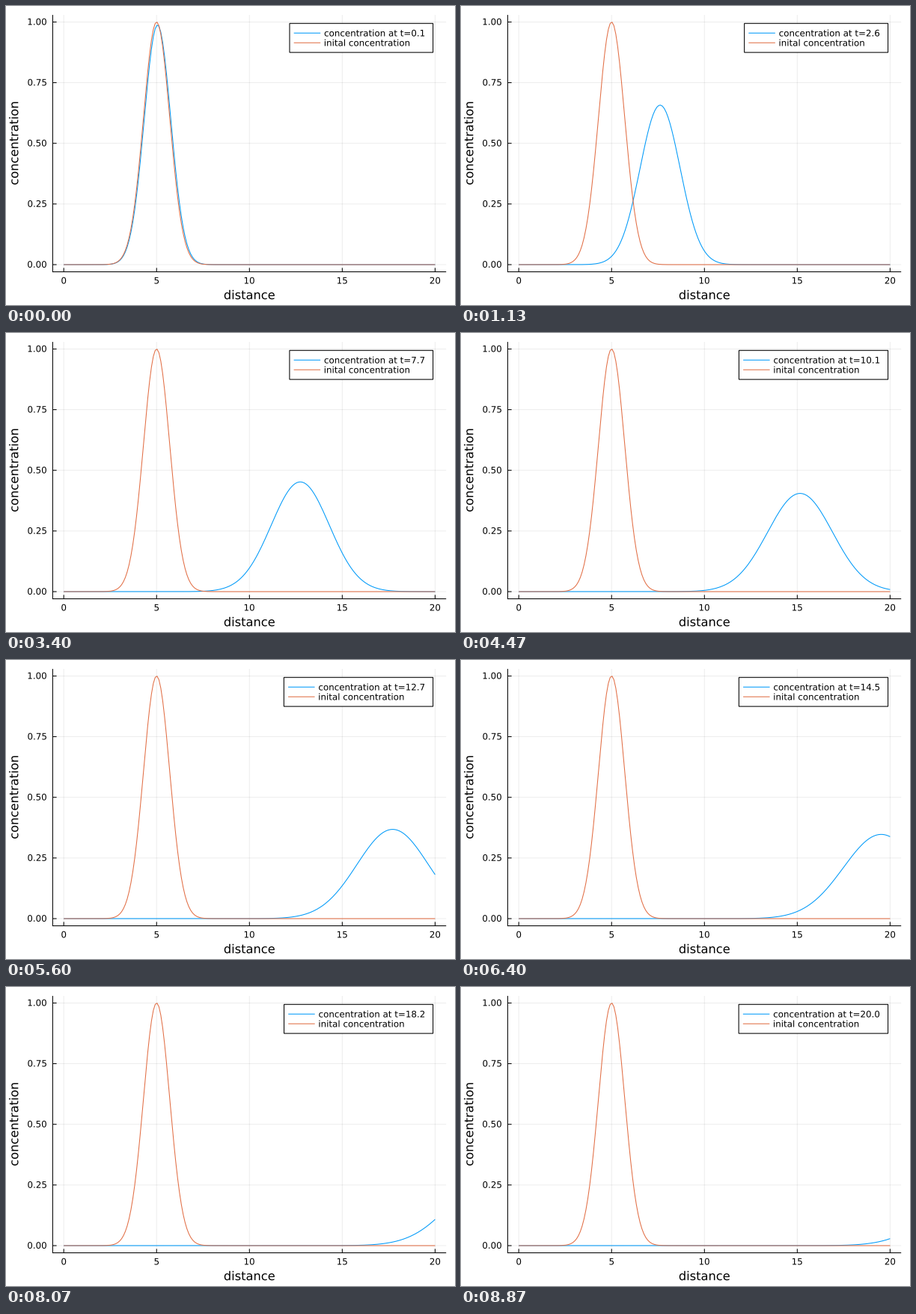
These frames come from a looping animation (600 px wide and 400 px high, 8.94 s). A matplotlib script:

```python
import matplotlib.pyplot as plt
import numpy as np
from matplotlib.animation import FuncAnimation
from matplotlib.patches import PathPatch, Rectangle
from matplotlib.textpath import TextPath
from matplotlib.transforms import Affine2D

plt.rcParams["font.family"] = "DejaVu Sans"

W, H, DPI = 600, 400, 100
LOOP_MS, TICK_MS, FPS, POSES = 8940, 20, 15, 134
BLUE, ORANGE = "#009AF9", "#E26F46"
LEFT, RIGHT, TOP, BOTTOM = 62.4, 588.2, 11.9, 355.6
SMALL, LARGE = 11.87, 16.25
DT, STRIDE = 0.05, 3
# The grid has 200 points over 20 units, while the steps assume a spacing of 0.1.
N = 200
STRETCH = 20 / (N - 1) / 0.1
DIFFUSION = 0.125 * STRETCH**2


def px(x):
    return 77.2 + np.asarray(x) * 24.81


def py(y):
    return 346.0 - np.asarray(y) * 324.6


def lw(pixels):
    return pixels * 72 / DPI


def glyphs(s, size, x, y, align="center", angle=0):
    """Text outline with its ink aligned at x and its baseline at y."""
    path = TextPath((0, 0), s, size=size)
    box = path.get_extents()
    anchor = {"left": box.x0, "right": box.x1, "center": (box.x0 + box.x1) / 2}[align]
    move = Affine2D().translate(-anchor, 0).scale(1, -1).rotate_deg(angle).translate(x, y)
    return path.transformed(move)


def add_text(*args, z=3, **kwargs):
    patch = PathPatch(glyphs(*args, **kwargs), fc="black", lw=0, zorder=z, snap=False)
    return ax.add_patch(patch)


def segment(xs, ys, color="black", width=1.05, z=2, **kwargs):
    return ax.plot(xs, ys, color=color, lw=lw(width), zorder=z, snap=False,
                   solid_capstyle="butt", **kwargs)[0]


fig = plt.figure(figsize=(W / DPI, H / DPI), dpi=DPI, facecolor="white")
ax = fig.add_axes([0, 0, 1, 1])
ax.axis("off")

for v in (0, 5, 10, 15, 20):
    x = px(v)
    segment([x, x], [TOP, BOTTOM], alpha=0.07, z=1)
    segment([x, x], [BOTTOM, BOTTOM - 5.2])
    add_text(str(v), SMALL, x, 371.5)
for v in (0, 0.25, 0.5, 0.75, 1):
    y = py(v)
    segment([LEFT, RIGHT], [y, y], alpha=0.07, z=1)
    segment([LEFT, LEFT + 5.2], [y, y])
    add_text(f"{v:.2f}", SMALL, 53.9, y + 3.9, align="right")
segment([LEFT, LEFT], [TOP, BOTTOM + 0.5])
segment([LEFT, RIGHT], [BOTTOM, BOTTOM])
add_text("distance", LARGE, 325.3, 392.2)
add_text("concentration", LARGE, 16.3, 183.7, angle=-90)

grid = np.linspace(0, 20, N)
blue = segment(px(grid), py(0 * grid), BLUE, z=4)
segment(px(grid), py(np.exp(-(grid - 5) ** 2)), ORANGE, z=5)

frame_box = ax.add_patch(Rectangle((379, 23.3), 192, 38.8, fc="white", ec="black",
                                   lw=lw(1.05), zorder=6, snap=False))
keys = [segment([0, 1], [y, y], c, z=7) for y, c in ((36.2, BLUE), (49.2, ORANGE))]
now_text = add_text("concentration", SMALL, 500, 40.5, z=7)
start_text = add_text("concentration", SMALL, 500, 53.5, z=7)

ax.set_xlim(0, W)
ax.set_ylim(H, 0)


def update(tick):
    # Poses change at 15 per second, with their starts rounded to 10 ms.
    pose = min((tick * TICK_MS + 15) * FPS // 1000, POSES - 1)
    t = DT * (1 + STRIDE * pose)
    spread = 1 + 4 * DIFFUSION * t
    center = 5 + STRETCH * t
    blue.set_ydata(py(np.exp(-(grid - center) ** 2 / spread) / np.sqrt(spread)))

    label = glyphs(f"concentration at t={t:.1f}", SMALL, 559.1, 40.5, align="right")
    left = label.get_extents().x0
    now_text.set_path(label)
    start_text.set_path(glyphs("inital concentration", SMALL, left + 0.2, 53.5, align="left"))
    for key in keys:
        key.set_xdata([left - 41, left - 5.5])
    frame_box.set_x(left - 46.7)
    frame_box.set_width(570.6 - left + 46.7)
    return blue, now_text, start_text, frame_box, *keys


anim = FuncAnimation(fig, update, frames=LOOP_MS // TICK_MS, init_func=lambda: update(0),
                     interval=TICK_MS, repeat=True, repeat_delay=0)
plt.show()
```
